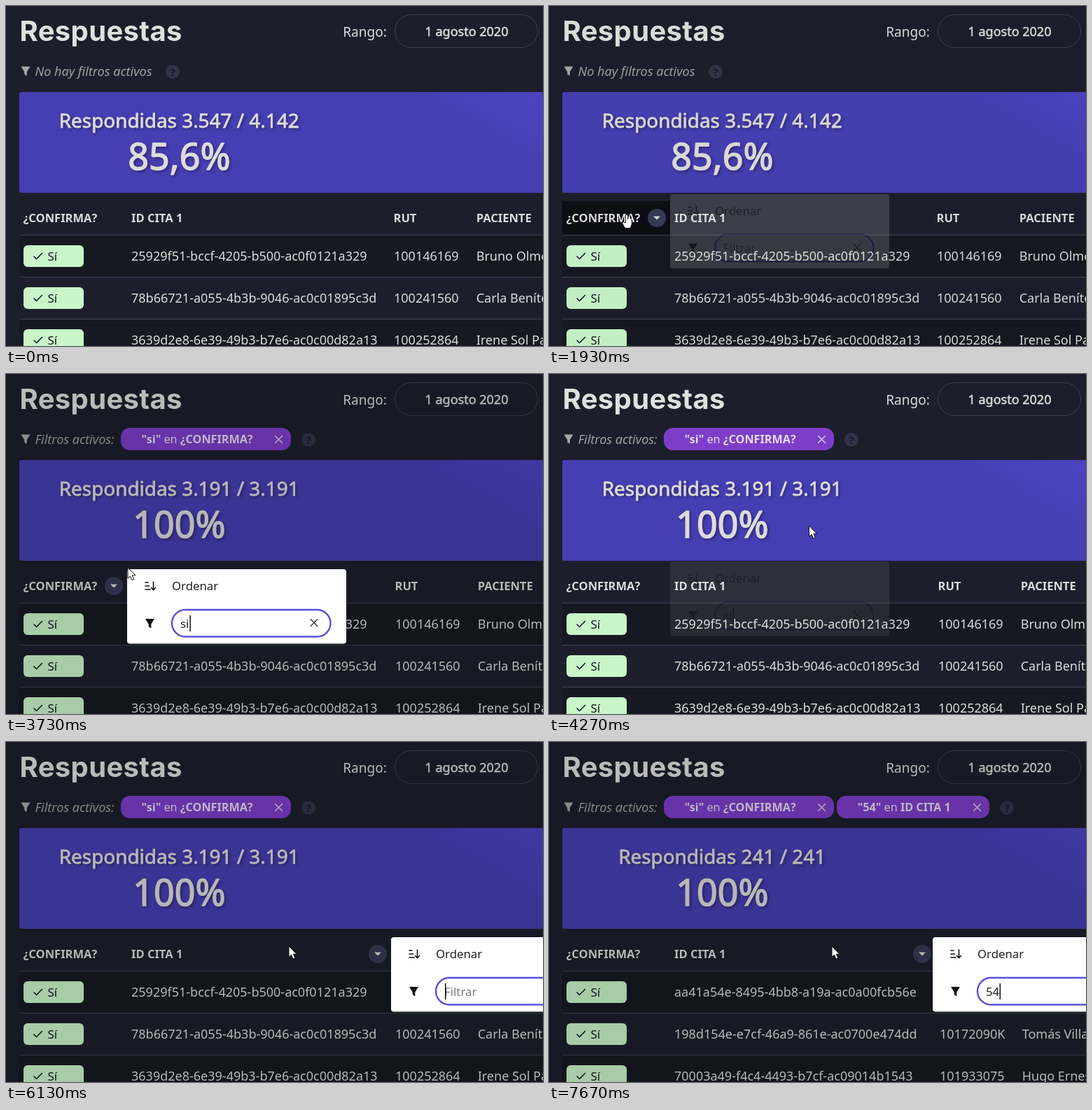
Recreate the animation shown at these times as an HTML page. Size 767 px wide and 486 px high, loop 8 s.

```html
<!DOCTYPE html>
<html lang="es">
<head>
<meta charset="utf-8">
<title>Respuestas</title>
<style>
  html, body { margin: 0; width: 100%; height: 100%; overflow: hidden; background: #1c1f2b; }
  svg { display: block; width: 767px; height: 486px; }
  text { font: 18px "Noto Sans", sans-serif; fill: #dcdcdc; white-space: pre; }
  .title { font: 700 40px Inter, sans-serif; letter-spacing: .35px; fill: #e0e0e0; }
  .head { font-size: 16.5px; font-weight: 600; }
  .note { font-style: italic; fill: #a0a0a2; }
  .medium { stroke: #dcdcdc; stroke-width: .028em; stroke-linejoin: round; }
  .sum { font-size: 27.9px; }
  .pct { font-size: 52px; }
  .mid { text-anchor: middle; }
  .banner text { filter: drop-shadow(2px 2px 2px rgba(0, 0, 0, .35)); }
  .menu text { font-size: 16.8px; fill: #222; }
  .tag text { font-size: 16.2px; fill: #e4dcee; }
  .tag tspan { font-weight: 600; }
  .line { fill: none; stroke-linecap: round; stroke-linejoin: round; }
</style>
</head>
<body>
<svg viewBox="0 0 767 486">
  <defs>
    <linearGradient id="glow" gradientUnits="userSpaceOnUse" x1="570" y1="123" x2="615" y2="40">
      <stop offset="0" stop-color="#463fb3"/>
      <stop offset="1" stop-color="#4c44c2"/>
    </linearGradient>
    <path id="funnel" d="M-6.5-6.5h13L1.8 1V7L-1.8 4.6V1Z"/>
    <path id="cross" class="line" d="M-5-5 5 5M5-5-5 5" stroke-width="1.5"/>
  </defs>
  <rect width="767" height="486" fill="#1c1f2b"/>
  <text class="title" x="19.5" y="50">Respuestas</text>
  <text x="481.3" y="43.5" style="font-size:19px">Rango:</text>
  <rect x="555.5" y="12.5" width="204" height="47" rx="23.5" fill="none" stroke="#3d404d"/>
  <text class="mid medium" x="658" y="43">1 agosto 2020</text>

  <use href="#funnel" x="28" y="93" fill="#a8a8aa"/>
  <text id="note" class="note" x="41.5" y="99.5"></text>
  <g id="tag0" class="tag"></g>
  <g id="tag1" class="tag"></g>
  <g id="help">
    <circle cy="94" r="10" fill="#303349"/>
    <text class="mid" y="99.5" style="font-size:15px;font-weight:700;fill:#171a26">?</text>
  </g>

  <g class="banner">
    <path d="M767 123H22q-3 0-3 3V264q0 3 3 3H767Z" fill="url(#glow)"/>
    <text id="sum" class="sum mid medium" x="247.2" y="174"></text>
    <text id="pct" class="pct mid medium" x="247.5" y="234"></text>
  </g>

  <rect id="cell" y="279" height="48" fill="#0d0e14"/>
  <text class="head" x="24.5" y="309">¿CONFIRMA?</text>
  <text class="head" x="179" y="309">ID CITA 1</text>
  <text id="rutHead" class="head" y="309">RUT</text>
  <text id="nameHead" class="head" y="309">PACIENTE</text>
  <g id="drop">
    <circle cy="303" r="13" fill="#363b55"/>
    <path d="M-5 300.5H5L0 305.5Z" fill="#dcdcdc"/>
  </g>
  <g id="rows"></g>

  <rect id="shade" width="767" height="486" fill="#000"/>

  <g id="menu" class="menu">
    <rect width="313" height="106.5" y="279" rx="4" fill="#fff"/>
    <path class="line" d="M26 298h4M26 303h5.5M26 308h7M37.5 297v11.5M34.5 305.5l3 3.2 3-3.2" stroke="#111" stroke-width="1.6"/>
    <text x="64" y="309">Ordenar</text>
    <use href="#funnel" x="32.5" y="356.5" fill="#111"/>
    <rect x="64" y="337" width="226.5" height="38.5" rx="19.2" fill="#fff" stroke="#5b50de" stroke-width="2.4"/>
    <text id="field" x="76" y="362.5"></text>
    <rect id="caret" y="345" width="1.4" height="23" fill="#000"/>
    <use href="#cross" x="267" y="355.5" stroke="#444"/>
  </g>

  <g id="pointer">
    <path id="arrow" d="M0 0V15.5L3.5 12.2 6 18 8.8 16.8 6.3 11.2H11Z" fill="#fff" stroke="#111"/>
    <path id="beam" class="line" d="M-3-7.5H4M.5-7.5V7.5M-3 7.5H4" stroke="#9a94bd"/>
    <path id="hand" d="M-1.5 1.5Q0-1 1.5 1.5V7Q3-.2 4-.2 5.2 6.8 6.2 7.2 7.5 7.5 7.2 9V14L5 19.5H-2.5L-6.2 12.5Q-6 9.5-3 11.5L-1.5 12Z" fill="#fff" stroke="#111" stroke-width=".8"/>
  </g>
</svg>
<script>
const LOOP = 8000;
const $ = id => document.getElementById(id);
const clamp = v => Math.min(1, Math.max(0, v));
const span = (t, a, b) => clamp((t - a) / (b - a));
const ease = p => p * p * (3 - 2 * p);
const within = (v, a, b) => v >= a && v < b;
const show = (id, on) => $(id).setAttribute('visibility', on ? 'visible' : 'hidden');
const set = (id, name, v) => $(id).setAttribute(name, v);
const write = (id, s) => { if ($(id).textContent !== s) $(id).textContent = s; };

// Table contents: id, RUT, patient
const first = [
  ['25929f51-bccf-4205-b500-ac0f0121a329', '100146169', 'Bruno Olmedo'],
  ['78b66721-a055-4b3b-9046-ac0c01895c3d', '100241560', 'Carla Benítez'],
  ['3639d2e8-6e39-49b3-b7e6-ac0c00d82a13', '100252864', 'Irene Sol Pardo']
];
const five = [first[0], first[1], ['5b17c0e4-93d2-4f6a-8c1e-ac0b00f2a7d5', '100318427', 'Nadia Ferrer']];
const fiftyFour = [
  ['aa41a54e-8495-4bb8-a19a-ac0a00fcb56e', '101655382', 'Elena Quiroz'],
  ['198d154e-e7cf-46a9-861e-ac0700e474dd', '10172090K', 'Tomás Villar'],
  ['70003a49-f4c4-4493-b7cf-ac09014b1543', '101933075', 'Hugo Ernesto']
];

const views = {
  all: { sum: '3.547 / 4.142', pct: '85,6%', tags: [], help: 238, shift: 0, rows: first },
  s: { sum: '3.191 / 3.191', pct: '100%', tags: ['s'], help: 424, shift: 2, rows: first },
  si: { sum: '3.191 / 3.191', pct: '100%', tags: ['si'], help: 432, shift: 2, rows: first },
  five: { sum: '2.846 / 2.846', pct: '100%', tags: ['si', '5'], help: 644, shift: 2, rows: five },
  both: { sum: '241 / 241', pct: '100%', tags: ['si', '54'], help: 654, shift: 4, rows: fiftyFour }
};
const viewTimes = [[0, 'all'], [2800, 's'], [3000, 'si'], [6600, 'five'], [6800, 'both'], [7600, 'five'], [7670, 'both']];
const typing = [[0, ''], [2730, 's'], [2930, 'si'], [4400, ''], [6600, '5'], [6800, '54'], [7600, '5'], [7670, '54']];
const caretOn = [[2000, 2470], [2730, 4400], [4950, 5530], [6130, 7330], [7600, LOOP]];
const fieldWidth = { '': 0, s: 8, si: 12.4, 5: 9.3, 54: 18.6 };
const columns = [[19, 173], [173, 550], [550, 668], [668, 767]];

// Pointer moves: start, end, then the four points of a cubic
const moves = [
  [70, 870, [742, 480], [640, 390], [500, 290], [398, 221]],
  [930, 1730, [398, 221], [290, 165], [103, 326], [111, 298]],
  [3600, 4000, [111, 298], [190, 270], [290, 240], [371.5, 217]],
  [4470, 4800, [371.5, 217], [380, 240], [395, 270], [404, 292]]
];

const at = (list, t) => list.filter(e => e[0] <= t).pop()[1];

function pointerAt(t) {
  const [a, b, ...p] = moves.filter(m => m[0] <= t).pop() || moves[0];
  const u = ease(span(t, a, b)), v = 1 - u;
  const w = [v * v * v, 3 * v * v * u, 3 * v * u * u, u * u * u];
  return [0, 1].map(k => w.reduce((s, c, i) => s + c * p[i][k], 0));
}

function tag(x, width, value, column) {
  return `<rect x="${x}" y="77" width="${width}" height="32" rx="13" fill="#7d3dc9"/>
    <text x="${x + 29.5}" y="99"><tspan>"${value}"</tspan> en <tspan>${column}</tspan></text>
    <use href="#cross" x="${x + width - 17.5}" y="93.5" stroke="#d8c8ea"/>`;
}

function row([id, rut, name], i, shift) {
  const y = 328 + 60 * i;
  return `<rect x="19" y="${y}" width="748" height="59" fill="${i % 2 ? '#1c1f2b' : '#161922'}"/>
    <path d="M19 ${y - .5}H767" stroke="#40434f"/>
    <rect x="25" y="${y + 14}" width="86" height="31" rx="6" fill="#c9f5c9"/>
    <path class="line" d="M40 ${y + 30}l3.5 3.5 8-8" stroke="#161922" stroke-width="1.6"/>
    <text x="59.5" y="${y + 36}" style="font-size:17px;fill:#161922">Sí</text>
    <text x="179" y="${y + 36}">${id}</text>
    <text x="${554 + shift}" y="${y + 36}">${rut}</text>
    <text x="${671.7 + shift}" y="${y + 36}">${name}</text>`;
}

let current;
function drawView(key) {
  if (key === current) return;
  current = key;
  const { sum, pct, tags, help, shift, rows } = views[key];
  write('note', tags.length ? 'Filtros activos:' : 'No hay filtros activos');
  write('sum', 'Respondidas ' + sum);
  write('pct', pct);
  $('tag0').innerHTML = tags[0] ? tag(164, tags[0] === 's' ? 235 : 243, tags[0], '¿CONFIRMA?') : '';
  $('tag1').innerHTML = tags[1] ? tag(411, tags[1] === '5' ? 208 : 218, tags[1], 'ID CITA 1') : '';
  set('help', 'transform', `translate(${help})`);
  set('rutHead', 'x', 553.5 + shift);
  set('nameHead', 'x', 671.7 + shift);
  $('rows').innerHTML = rows.map((r, i) => row(r, i, shift)).join('');
}

function hoverColumn(t, x, y) {
  if (within(t, 1800, 3600)) return 0;
  if (t < 70 || t >= 5200 || within(t, 930, 4470) || !within(y, 279, 327)) return -1;
  return columns.findIndex(([a, b]) => within(x, a, b));
}

function draw(t) {
  const key = at(viewTimes, t);
  const [x, y] = pointerAt(t);
  drawView(key);

  // Header cell under the pointer
  const col = hoverColumn(t, x, y);
  const second = t >= 4470;
  const iconCol = second && t >= 4800 ? 1 : within(t, 1800, 4000) ? 0 : col;
  show('cell', col >= 0);
  show('drop', iconCol >= 0);
  if (col >= 0) {
    set('cell', 'x', columns[col][0]);
    set('cell', 'width', columns[col][1] - columns[col][0]);
  }
  if (iconCol >= 0) set('drop', 'transform', `translate(${columns[iconCol][1] - 19 + (key === 'both' ? 2 : 0)})`);

  // Menu and the shade behind it
  const opened = second ? span(t, 4800, 5070) : span(t, 1870, 2130);
  const closed = second ? 0 : span(t, 4000, 4330);
  const alpha = ease(opened) * (1 - closed) ** 1.5;
  const lift = -12 * (1 - ease(opened)) - 12 * ease(closed);
  const left = second ? (key === 'both' ? 548 : 550) : 173;
  const value = at(typing, t);
  set('shade', 'opacity', .17 * ease(opened) * (second ? 1 : 1 - span(t, 4000, 4200)));
  set('menu', 'opacity', alpha);
  set('menu', 'transform', `translate(${left} ${lift})`);
  write('field', value || 'Filtrar');
  $('field').style.fill = value ? '#222' : '#7c7c82';
  set('caret', 'x', 77 + fieldWidth[value]);
  show('caret', caretOn.some(([a, b]) => within(t, a, b)));

  // Pointer shape
  const hand = within(y, 279, 327) && (t < 3600 || within(t, 4470, 4870));
  const beam = t < 3600 && within(x, 172, 322) && within(y, 145, 262);
  set('pointer', 'transform', `translate(${x} ${y})`);
  show('arrow', t >= 70 && !hand && !beam);
  show('beam', t >= 70 && beam);
  show('hand', t >= 70 && hand);
}

const start = performance.now();
function tick() {
  draw((performance.now() - start) % LOOP);
  requestAnimationFrame(tick);
}
tick();
</script>
</body>
</html>
```
